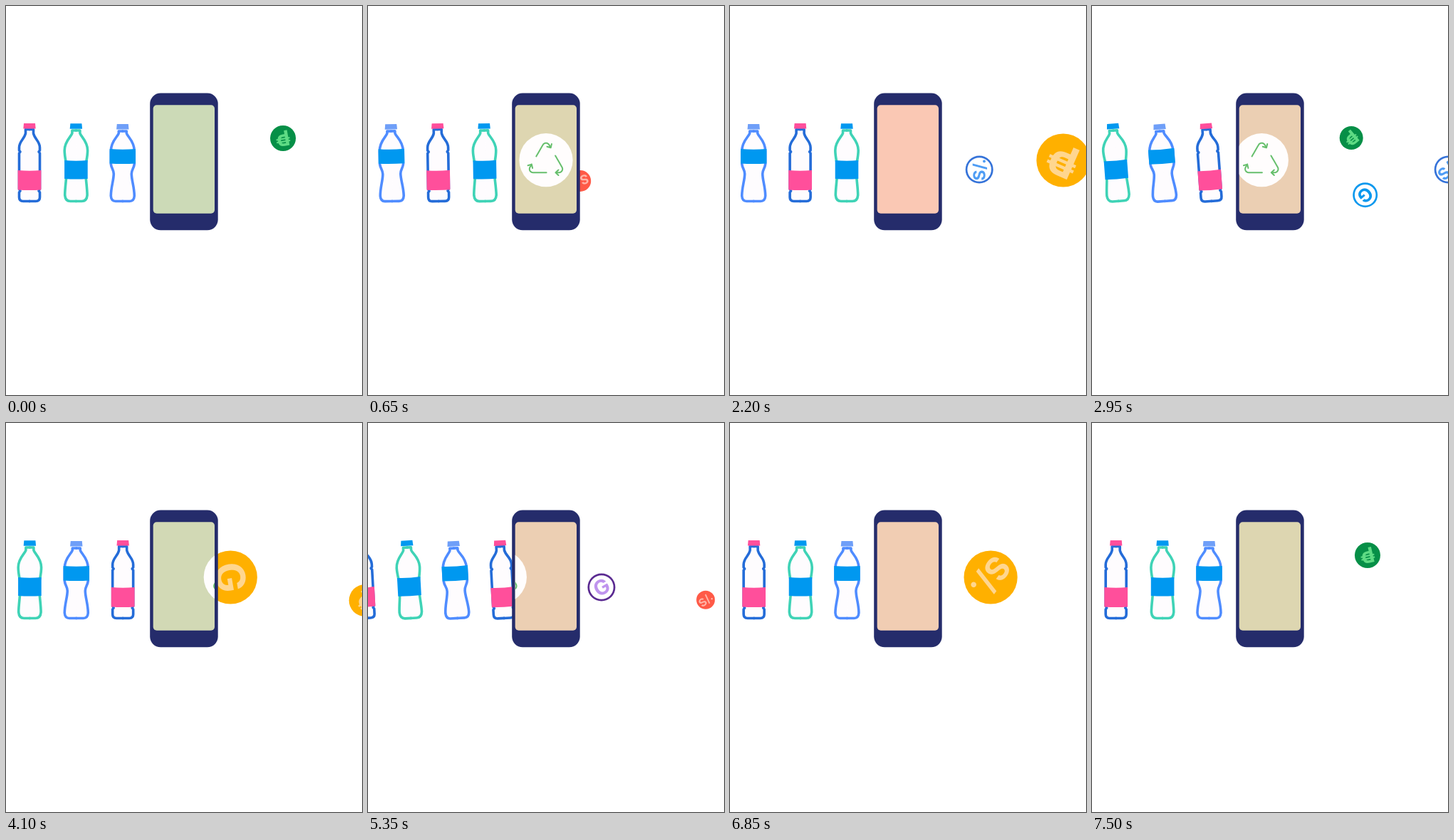
An HTML page with a canvas that plays this animation: 500x547 px, repeating every 7.55 s.

```html
<!DOCTYPE html>
<html>
<head>
<meta charset="utf-8">
<style>
html, body { margin: 0; width: 100%; height: 100%; overflow: hidden; background: #fff; }
canvas { display: block; width: 500px; height: 547px; }
</style>
</head>
<body>
<canvas></canvas>
<script>
const LOOP = 7550, STEP = LOOP / 3, GAP = 65.4;
const canvas = document.querySelector('canvas'), c = canvas.getContext('2d');
const dpr = window.devicePixelRatio || 1;
canvas.width = 500 * dpr;
canvas.height = 547 * dpr;

const clamp = v => Math.max(0, Math.min(1, v));
const mix = (a, b, k) => a + (b - a) * k;
const ease = v => (v = clamp(v), v < .5 ? 4 * v ** 3 : 1 - 4 * (1 - v) ** 3);
const rad = deg => deg * Math.PI / 180;

// Each bottle is the right half of an outline, mirrored when drawn
const bottles = [
  { line: '#246cd8', cap: '#ff4f9b', label: '#ff4f9b', w: 16.4, y1: 231, y2: 258.5, top: 165,
    half: 'M-1 173.5H5.5V179C7 187 14.5 190 14.5 199V203L13 205L14.5 207V257L13 260L14.5 262V269Q14.5 274.5 9 274.5H-1' },
  { line: '#3fd3b6', cap: '#0098f0', label: '#0098f0', w: 16.3, y1: 217, y2: 243, top: 165.2,
    half: 'M-1 175H5.5V179C7 184 16.2 190 16.2 203C16.2 214 13 222 13 228C13 240 15.7 255 15.7 266Q15 274.5 8 274.5H-1' },
  { line: '#4f8cff', cap: '#6f9ff8', label: '#0098f0', w: 18.2, y1: 201, y2: 221.5, top: 166,
    half: 'M-1 176H5.5V179C7 184 16.5 190 16.5 204V222C16 228 12.5 230 12.5 236C12.5 245 16.5 255 16.5 267Q16 274.5 10 274.5H-1' }
].map(b => ({ ...b, half: new Path2D(b.half) }));

// time, x, y, radius, speed, cubic speed, fill, ring, glyph colour, glyph, angle
const coins = [
  [0, 389, 186, 18, .04, 5.2e-7, '#068f47', '', '#5edb84', '₱', 170],
  [1400, 373, 222, 18, .2, 0, '#8f1fa5', '', '#d27be0', 'G', 25],
  [1400, 448, 246, 15, .2, 0, '#ff5a47', '', '#ffb5a8', 'S/.', 205],
  [2950, 364, 185.5, 16.5, .2, 0, '#068f47', '', '#5edb84', '₱', 140],
  [2950, 383.5, 265.7, 17.5, .2, 0, '#fff', '#0a98ee', '#0a98ee', 'G', 140],
  [2950, 500, 230, 19.5, .2, 0, '#fff', '#3573d9', '#4f9df5', 'S/.', -45],
  [4100, 504, 249.5, 22.5, .2, 0, '#ffb000', '', '#ffd68f', '₱', 140],
  [5350, 474, 248.7, 13, .2, 0, '#ff5a47', '', '#ffb5a8', 'S/.', -40],
  [5350, 327.7, 231, 19.5, .215, 0, '#fff', '#5a2a91', '#bf94ee', 'G', -30]
];
const glyphSize = { '₱': 1.65, 'G': 1.5, 'S/.': 1.2 };

function disc(x, y, r, fill) {
  c.fillStyle = fill;
  c.beginPath();
  c.arc(x, y, r, 0, 7);
  c.fill();
}

function box(x, y, w, h, r, fill) {
  c.fillStyle = fill;
  c.beginPath();
  c.roundRect(x, y, w, h, r);
  c.fill();
}

function coin(x, y, r, fill, ring, ink, glyph, angle) {
  disc(x, y, r, ring || fill);
  if (ring) disc(x, y, r - 2.7, fill);
  c.save();
  c.translate(x, y);
  c.rotate(rad(angle));
  c.fillStyle = ink;
  c.textAlign = 'center';
  const size = r * glyphSize[glyph];
  c.font = `700 ${size}px Inter, "Noto Sans", sans-serif`;
  c.fillText(glyph, 0, size * .36);
  c.restore();
}

function bottle(b, x, tilt) {
  c.save();
  c.translate(x, 222);
  c.rotate(rad(tilt));
  c.translate(0, -222);
  c.strokeStyle = b.line;
  c.lineWidth = 3.6;
  c.lineJoin = 'round';
  for (const paint of ['fill', 'stroke']) {
    for (const side of [1, -1]) {
      c.save();
      c.scale(side, 1);
      c.fillStyle = '#fefcfe';
      c[paint](b.half);
      c.restore();
    }
  }
  c.fillStyle = b.cap;
  c.beginPath();
  c.moveTo(-8, b.top);
  c.lineTo(8, b.top);
  c.lineTo(8.7, b.top + 7.5);
  c.lineTo(-8.7, b.top + 7.5);
  c.fill();
  c.fillStyle = b.label;
  c.beginPath();
  c.moveTo(-b.w, b.y1);
  c.quadraticCurveTo(0, b.y1 + 1.5, b.w, b.y1);
  c.lineTo(b.w, b.y2);
  c.quadraticCurveTo(0, b.y2 + 1, -b.w, b.y2);
  c.fill();
  c.restore();
}

// Point and heading at distance s, clockwise along a rounded triangle
const INNER = 15.5, ROUND = 5, SIDE = 36.4, THIRD = SIDE + ROUND * rad(120);
function trianglePoint(s) {
  const k = Math.floor(s / THIRD), u = s - k * THIRD;
  const bend = Math.max(0, u - SIDE) / ROUND;
  const x = Math.min(u, SIDE) - SIDE / 2 + ROUND * Math.sin(bend);
  const y = ROUND - INNER - ROUND * Math.cos(bend);
  const a = rad(k * 120 - 60);
  return [x * Math.cos(a) - y * Math.sin(a), x * Math.sin(a) + y * Math.cos(a), a + bend];
}

function recycle(x, y, head) {
  c.save();
  c.translate(x, y);
  c.strokeStyle = '#66bf6c';
  c.lineWidth = 2;
  c.lineCap = c.lineJoin = 'round';
  c.beginPath();
  for (let k = 0; k < 3; k++) {
    const end = head + k * THIRD;
    for (let d = 34; d >= 0; d--) {
      const [px, py] = trianglePoint(end - d);
      d === 34 ? c.moveTo(px, py) : c.lineTo(px, py);
    }
    const [px, py, a] = trianglePoint(end);
    for (const turn of [-.75, .75]) {
      c.moveTo(px, py);
      c.lineTo(px - 5.5 * Math.cos(a + turn), py - 5.5 * Math.sin(a + turn));
    }
  }
  c.stroke();
  c.restore();
}

function screenColour(t) {
  const stops = [[0, .93], [.274, .35], [.325, 0], [.46, 0], [.702, .36], [.786, .62], [.976, .82], [1, .93]];
  const u = t / 4200 % 1;
  const i = stops.findIndex(s => s[0] > u);
  const [a, b] = [stops[i - 1], stops[i]];
  const g = mix(a[1], b[1], (u - a[0]) / (b[0] - a[0]));
  const pink = [255, 198, 181], sand = [221, 214, 177], green = [200, 219, 184];
  const rgb = pink.map((p, j) => Math.round(g < .62 ? mix(p, sand[j], g / .62) : mix(sand[j], green[j], (g - .62) / .38)));
  return `rgb(${rgb})`;
}

function draw(t) {
  const n = Math.floor(t / STEP), p = t - n * STEP;
  c.setTransform(dpr, 0, 0, dpr, 0, 0);
  c.fillStyle = '#fff';
  c.fillRect(0, 0, 500, 547);

  const shift = GAP * ease((p - 214) / 230) + .7 * t / LOOP;
  const tilt = -4.2 * Math.sin(Math.PI * clamp((p - 184) / 500));
  for (let i = -1; i < 3; i++)
    bottle(bottles[(i - n + 6) % 3], 33 + GAP * i + shift, tilt);

  for (const [time, x, y, r, v, cubic, fill, ring, ink, glyph, angle] of coins) {
    const d = (t - time + LOOP * 1.5) % LOOP - LOOP / 2;
    const px = x + v * d + cubic * d ** 3;
    if (px > 270 && px < 530) coin(px, y, r, fill, ring, ink, glyph, angle + .06 * d);
  }

  const out = Math.max(0, p - 1200);
  const x = 164 + 86 * ease((p - 153) / 416) + .14 * out + 7.77e-5 * out * out;
  if (out) coin(x, 217, 37.6, '#ffb000', '', '#ffd68f', ['₱', 'G', 'S/.'][n], 80 + .2 * (p - 1583));

  box(202.2, 122.6, 95.5, 192.7, 15, '#252c6b');
  box(206.7, 139.2, 86.3, 152.6, 5, screenColour(t));
  c.save();
  c.clip();
  disc(x, 216.7, 37.6, '#fffdfd');
  recycle(x, 218.7, 51.6 + .145 * out);
  c.restore();
}

const start = performance.now();
function tick() {
  draw((performance.now() - start) % LOOP);
  requestAnimationFrame(tick);
}
tick();
</script>
</body>
</html>
```
